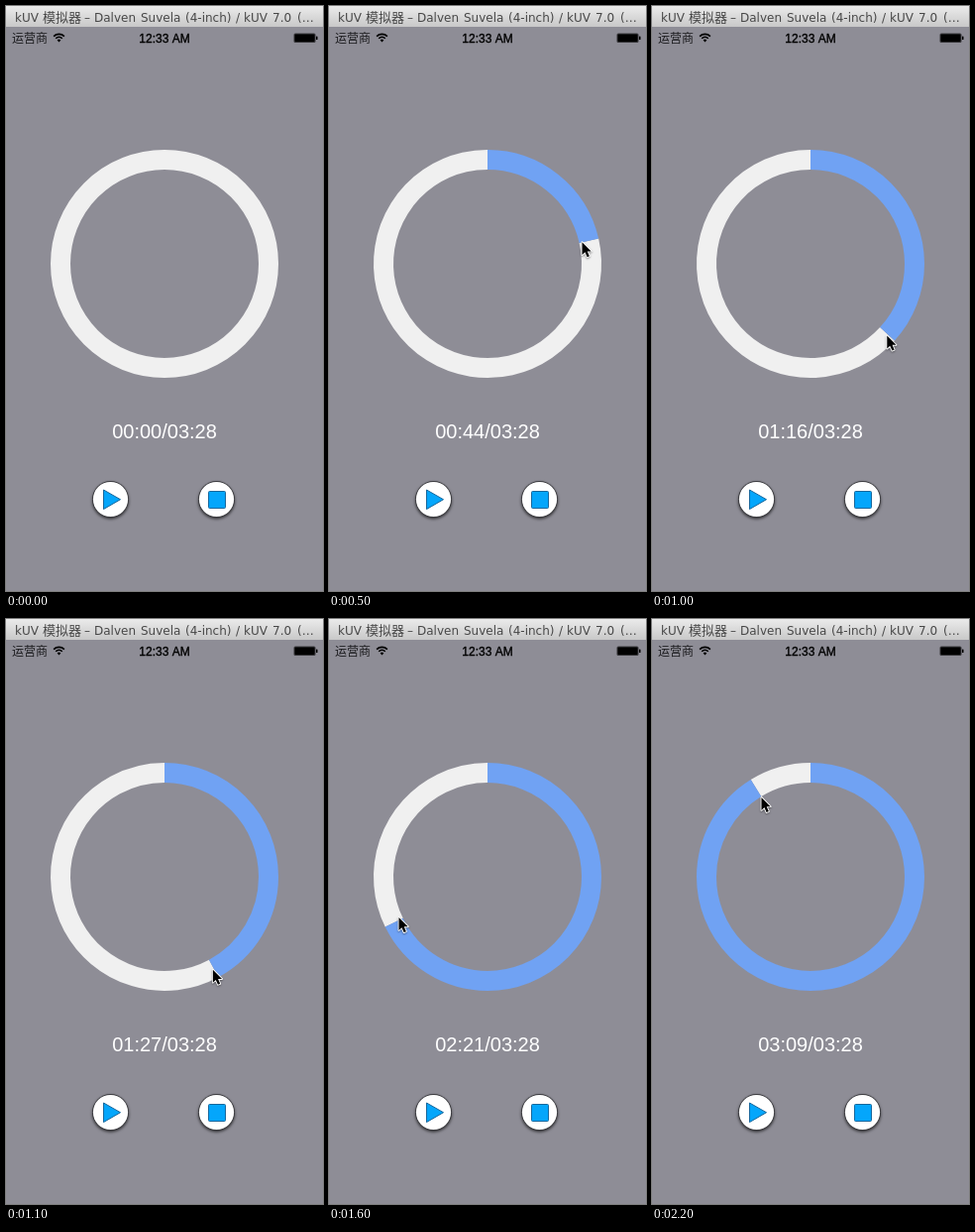
Recreate the animation shown at these times as an HTML page with a canvas. Size 320 by 590 pixels, loop 2.4 s.

```html
<!DOCTYPE html>
<html lang="zh">
<head>
<meta charset="utf-8">
<title>Circular player</title>
<style>
html, body { margin: 0; width: 100%; height: 100%; overflow: hidden; background: #8e8d96; }
canvas { display: block; }
</style>
</head>
<body>
<canvas id="stage" width="320" height="590"></canvas>
<script>
const ctx = document.getElementById('stage').getContext('2d');
const LOOP = 2400, STEP = 100, TOTAL = 208.25;
const CX = 160, CY = 260, RAD = Math.PI / 180;
const SANS = '"Liberation Sans", Arial, sans-serif';
const CJK = '"Noto Sans CJK SC", "Noto Sans CJK", sans-serif';
const UI = '"DejaVu Sans", sans-serif';

// time, arc angle, pointer angle, pointer radius
const KEYS = [
  [0, 0, 0, 100],
  [500, 77.2, 76.5, 97.7],
  [600, 77.2, 76.5, 97.7],
  [1000, 132.4, 133, 105],
  [1300, 194.4, 195.3, 102.6],
  [1600, 243.9, 246, 98.5],
  [1800, 288.75, 291, 98.8],
  [2200, 328.4, 328.3, 95.2],
  [2400, 328.4, 328.3, 95.2]
];

const secant = (i, k) => (KEYS[i + 1][k] - KEYS[i][k]) / (KEYS[i + 1][0] - KEYS[i][0]);

function slope(i, k) {
  if (i === 0) return secant(0, k);
  if (i === KEYS.length - 1) return 0;
  const a = secant(i - 1, k), b = secant(i, k);
  return a * b > 0 ? 2 * a * b / (a + b) : 0;
}

// Monotone cubic through the keys
function sample(t, k) {
  let i = 0;
  while (i < KEYS.length - 2 && t >= KEYS[i + 1][0]) i++;
  const p = KEYS[i], q = KEYS[i + 1], d = q[0] - p[0];
  const u = (t - p[0]) / d, v = 1 - u;
  return p[k] * v * v * (1 + 2 * u) + q[k] * u * u * (3 - 2 * u)
    + d * u * v * (slope(i, k) * v - slope(i + 1, k) * u);
}

function text(str, x, y, font, color, align = 'left') {
  ctx.font = font;
  ctx.fillStyle = color;
  ctx.textAlign = align;
  ctx.fillText(str, x, y);
}

function poly(points) {
  ctx.beginPath();
  points.forEach(([x, y]) => ctx.lineTo(x, y));
  ctx.closePath();
}

function box(x, y, w, h, r, color) {
  ctx.fillStyle = color;
  ctx.beginPath();
  ctx.roundRect(x, y, w, h, r);
  ctx.fill();
}

function shadow(color, blur, dy) {
  ctx.shadowColor = color;
  ctx.shadowBlur = blur;
  ctx.shadowOffsetY = dy;
}

function titleBar() {
  const g = ctx.createLinearGradient(0, 0, 0, 21);
  g.addColorStop(0, '#ebebeb');
  g.addColorStop(1, '#c8c8c8');
  ctx.fillStyle = g;
  ctx.fillRect(0, 0, 320, 21);
  const parts = [
    ['kUV', 9], ['–', 79], ['Dalven', 89], ['Suvela', 136],
    ['(4-inch)', 181], ['/', 232], ['kUV', 240], ['7.0', 269], ['(…', 294]
  ];
  for (const [s, x] of parts) text(s, x, 16, '12px ' + UI, '#484848');
  text('模拟器', 37, 16, '13px ' + CJK, '#484848');
}

function statusBar() {
  text('运营商', 6, 36.5, '12px ' + CJK, '#1c1c1f');
  text('12:33 AM', 160, 36.5, '12px ' + SANS, '#000', 'center');
  ctx.strokeStyle = '#000';
  ctx.lineWidth = 0.35;
  ctx.strokeText('12:33 AM', 160, 36.5);

  ctx.lineWidth = 1.6;
  for (const r of [4.6, 7.6]) {
    ctx.beginPath();
    ctx.arc(53.5, 36, r, -135 * RAD, -45 * RAD);
    ctx.stroke();
  }
  ctx.beginPath();
  ctx.moveTo(53.5, 36.5);
  ctx.arc(53.5, 36, 2.4, -140 * RAD, -40 * RAD);
  ctx.fill();

  box(290.5, 27.5, 22, 9.5, 1.5, 'rgba(0,0,0,.6)');
  box(291.5, 28.5, 20, 7.5, 1, '#000');
  box(313, 30.5, 1.5, 3.5, 0.5, '#000');
}

function arc(from, to, color) {
  ctx.strokeStyle = color;
  ctx.lineWidth = 20;
  ctx.beginPath();
  ctx.arc(CX, CY, 105, (from - 90) * RAD, (to - 90) * RAD);
  ctx.stroke();
}

function disc(x) {
  ctx.save();
  shadow('rgba(0,0,0,.65)', 3, 1.5);
  ctx.fillStyle = '#3c3c40';
  ctx.beginPath();
  ctx.arc(x, 497.5, 18.5, 0, 7);
  ctx.fill();
  ctx.restore();
  ctx.fillStyle = '#fff';
  ctx.beginPath();
  ctx.arc(x, 497.5, 17.6, 0, 7);
  ctx.fill();
}

function icon() {
  ctx.fillStyle = '#04a6fb';
  ctx.strokeStyle = '#17679c';
  ctx.lineWidth = 1;
  ctx.lineJoin = 'round';
  ctx.fill();
  ctx.stroke();
}

function buttons() {
  disc(105.5);
  poly([[98.5, 488], [115.5, 497.7], [98.5, 507.5]]);
  icon();
  disc(212.5);
  ctx.beginPath();
  ctx.roundRect(204.5, 489.5, 17, 17, 1);
  icon();
}

function pointer(x, y) {
  ctx.save();
  ctx.translate(x, y);
  ctx.scale(0.92, 0.92);
  poly([[0, 0], [0, 14], [3.2, 11], [5.6, 16.3], [8, 15.3], [5.7, 10], [10, 10]]);
  ctx.lineJoin = 'round';
  ctx.lineWidth = 2;
  ctx.strokeStyle = '#fff';
  shadow('rgba(0,0,0,.4)', 2, 1);
  ctx.stroke();
  shadow('transparent', 0, 0);
  ctx.fillStyle = '#000';
  ctx.fill();
  ctx.restore();
}

function clock(s) {
  const two = n => String(n).padStart(2, '0');
  const n = Math.floor(s);
  return two(Math.floor(n / 60)) + ':' + two(n % 60);
}

function draw(t) {
  const angle = sample(t, 1);
  ctx.fillStyle = '#8e8d96';
  ctx.fillRect(0, 0, 320, 590);
  titleBar();
  statusBar();
  arc(angle, 360, '#f0f0f0');
  if (angle > 0) arc(0, angle, '#70a2f3');
  const label = clock(angle / 360 * TOTAL) + '/' + clock(TOTAL);
  text(label, CX, 436, '20px ' + SANS, '#fff', 'center');
  buttons();
  if (t > 0) {
    const a = sample(t, 2) * RAD, r = sample(t, 3);
    pointer(CX + r * Math.sin(a) + 0.5, CY - r * Math.cos(a) + 1);
  }
}

const start = performance.now();
function frame() {
  const t = (performance.now() - start) % LOOP;
  draw(Math.floor(t / STEP) * STEP);
  requestAnimationFrame(frame);
}
frame();
</script>
</body>
</html>
```
